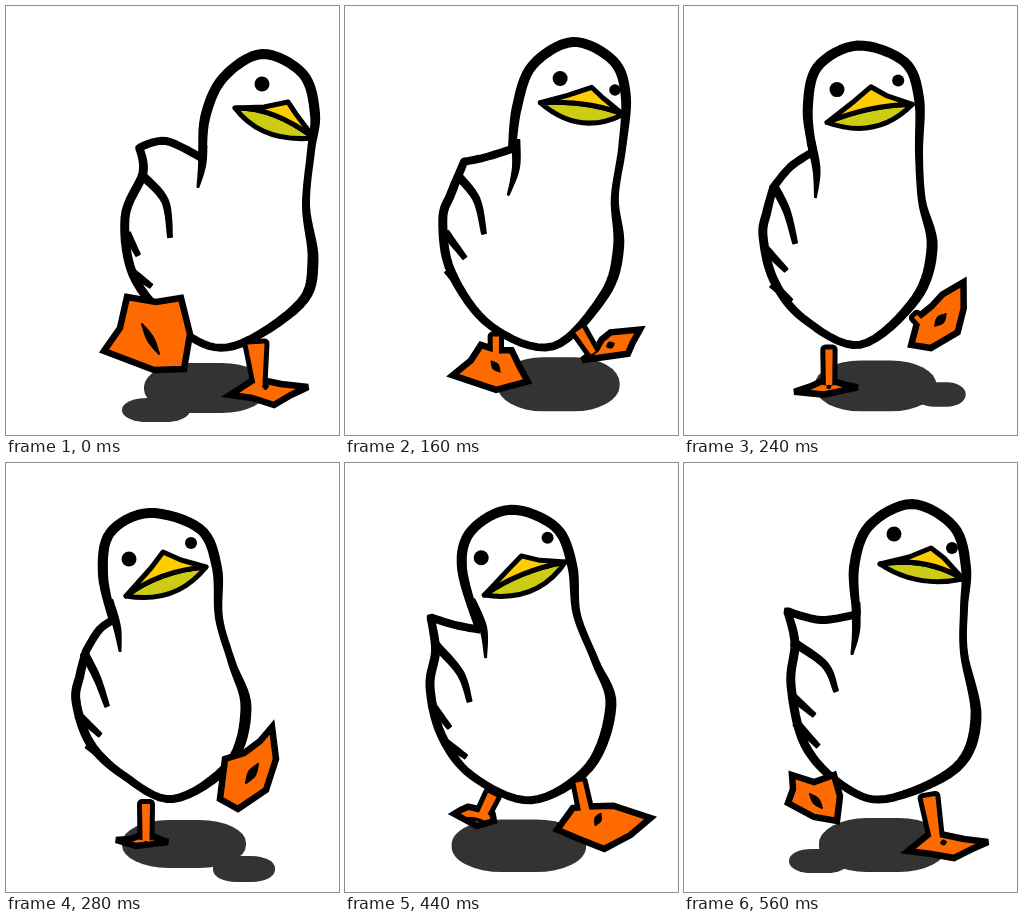
An HTML page that plays this animation: 333 px wide and 429 px high, repeating every 600 ms.

```html
<!DOCTYPE html>
<html lang="en">
<head>
<meta charset="utf-8">
<title>Walking duck</title>
<style>
html, body { margin: 0; width: 100%; height: 100%; overflow: hidden; background: #fff; }
svg { display: block; width: 100%; height: 100%; }
</style>
</head>
<body>
<svg id="stage" viewBox="0 0 333 429" stroke-linejoin="round"></svg>
<script>
const LOOP = 600, STEP = 40;
const INK = '#000', ORANGE = '#ff6a00', YELLOW = '#ffcc00', OLIVE = '#cccc14', SHADE = '#333';
const BODY_W = [8, 10, 10, 10, 10, 10, 8, 8, 11, 10, 8, 8, 9, 9, 9, 8, 8];
const poses = [];
const pose = (t, parts) => poses.push({ t, ...parts });

// body runs clockwise from the neck joint; feet run around their webbing
pose(0, {
  body: [197,153, 199,112, 217,72, 256,48, 297,68, 309,108, 305,145, 300,200, 307,255, 294,298, 228,340, 180,328, 130,275, 119,212, 137,167, 133,142, 160,135],
  neck: [197,140, 196,160, 192,181], wing: [137,170, 159,195, 164,231],
  notches: [121,228, 132,249, 127,267, 145,280],
  eyes: [256,78,7.5, 309,100,4],
  beak: [229,102, 258,101, 282,96, 290,108, 308,132, 262,127, 268,109],
  footL: [121,291, 150,296, 175,292, 184,328, 178,363, 148,364, 98,345, 114,322],
  footR: [224,389, 247,374, 256,374, 275,378, 302,381, 285,389, 268,399, 246,392],
  legL: [150,310,8, 150,330,8], legR: [250,338,17, 253,378,7],
  holeL: [136,318, 153,348, 8], holeR: [257,380, 262,380, 8],
  shade: [200,382,62,25, 150,404,34,12]
});
pose(80, {
  body: [185,159, 199,112, 218,74, 256,50, 296,72, 309,108, 303,150, 298,200, 300,250, 292,294, 240,338, 183,330, 122,266, 111,205, 128,172, 145,134, 163,150],
  neck: [195,136, 190,158, 180,178], wing: [128,173, 155,195, 164,224],
  notches: [115,222, 132,247, 114,250, 120,268],
  eyes: [258,78,7.5, 305,110,5],
  beak: [235,97, 258,100, 286,97, 292,108, 305,136, 262,127, 275,109],
  footL: [124,276, 155,288, 182,289, 185,328, 174,362, 148,365, 102,326, 119,305],
  footR: [228,379, 250,369, 256,369, 272,371, 293,371, 282,376, 275,382, 250,378],
  legL: [150,305,6, 150,325,6], legR: [247,337,17, 252,374,7],
  holeL: [142,308, 157,341, 8], holeR: [258,375, 263,376, 4],
  shade: [222,378,64,26, 150,412,37,15]
});
pose(200, {
  body: [154,138, 153,98, 166,55, 207,32, 249,49, 262,85, 260,140, 254,190, 260,238, 243,288, 190,341, 128,315, 98,268, 90,220, 95,195, 104,168, 125,153],
  neck: [154,134, 157,164, 152,193], wing: [103,170, 118,195, 125,231],
  notches: [92,232, 112,256, 97,273, 113,289],
  eyes: [188,73,7.5, 247,73,6],
  beak: [171,101, 200,87, 221,76, 235,86, 259,97, 217,114, 217,96],
  footL: [140,368, 150,370, 158,369, 168,375, 184,381, 150,391, 110,388, 128,377],
  footR: [238,343, 248,328, 255,315, 262,304, 293,299, 288,318, 283,333, 258,341],
  legL: [150,342,7, 150,374,6], legR: [229,317,5, 246,333,5],
  holeL: [147,377, 152,377, 7], holeR: [261,325, 269,319, 9],
  shade: [205,379,60,27, 262,376,22,12]
});
pose(280, {
  body: [107,157, 97,112, 104,70, 143,50, 194,66, 211,105, 213,155, 226,200, 240,245, 224,300, 167,336, 117,312, 84,280, 70,238, 74,212, 80,188, 93,167],
  neck: [103,138, 111,164, 114,188], wing: [78,190, 91,215, 101,243],
  notches: [72,252, 94,272, 82,282, 102,299],
  eyes: [123,96,7.5, 185,80,6],
  beak: [120,133, 145,105, 157,89, 175,97, 200,104, 165,130, 157,113],
  footL: [133,373, 141,375, 147,373, 153,376, 162,379, 130,383, 110,377, 124,376],
  footR: [214,336, 219,296, 238,290, 254,278, 266,264, 270,296, 260,327, 232,346],
  legL: [140,341,8, 140,379,7], legR: [235,305,5, 240,315,5],
  holeL: [139,379, 141,379, 2], holeR: [240,320, 252,301, 9],
  shade: [178,381,62,24, 238,406,31,13]
});
pose(360, {
  body: [113,163, 92,108, 101,75, 140,54, 187,72, 206,115, 212,153, 229,194, 242,240, 218,312, 168,335, 120,312, 86,275, 73,228, 77,190, 97,153, 106,158],
  neck: [104,142, 117,165, 123,191], wing: [82,200, 99,220, 105,246],
  notches: [76,252, 97,272, 87,285, 108,300],
  eyes: [120,102,7.5, 180,80,6],
  beak: [118,138, 138,112, 152,97, 170,102, 193,106, 165,134, 156,117],
  footL: [132,368, 141,370, 148,363, 156,367, 165,372, 140,379, 111,376, 124,372],
  footR: [207,318, 206,291, 226,286, 243,270, 272,300, 267,330, 238,349, 215,339],
  legL: [143,338,12, 140,372,8], legR: [228,303,5, 236,313,5],
  holeL: [139,374, 141,374, 2], holeR: [236,325, 240,290, 9],
  shade: [167,384,64,27, 232,411,35,16]
});
pose(480, {
  body: [147,166, 133,105, 143,64, 183,43, 227,61, 242,98, 245,150, 262,200, 278,245, 258,300, 195,338, 133,314, 103,272, 92,222, 98,187, 82,156, 112,163],
  neck: [140,136, 150,166, 150,195], wing: [96,174, 124,205, 135,234],
  notches: [93,237, 110,260, 105,274, 127,290],
  eyes: [151,89,7.5, 219,74,6],
  beak: [154,126, 180,103, 194,90, 212,95, 238,98, 200,124, 192,108],
  footL: [118,331, 130,334, 141,337, 145,343, 143,353, 128,356, 108,340, 112,335],
  footR: [216,389, 239,369, 250,369, 280,375, 318,377, 293,388, 270,400, 243,392],
  legL: [148,329,8, 136,343,8], legR: [238,327,9, 246,376,10],
  holeL: [118,345, 138,351, 5], holeR: [257,378, 263,378, 7],
  shade: [180,382,68,26, 125,372,20,10]
});
pose(560, {
  body: [173,151, 170,105, 185,63, 228,41, 270,64, 282,105, 280,145, 280,190, 292,255, 272,305, 202,336, 158,322, 121,282, 107,222, 111,180, 103,148, 137,157],
  neck: [172,140, 172,168, 168,191], wing: [109,179, 141,202, 152,228],
  notches: [109,234, 130,252, 112,260, 134,283],
  eyes: [210,71,7.5, 268,85,6],
  beak: [196,101, 225,94, 247,85, 260,95, 279,116, 235,117, 240,101],
  footL: [108,312, 130,319, 150,312, 156,333, 153,358, 130,354, 104,340, 109,326],
  footR: [224,388, 246,370, 256,371, 280,376, 304,379, 288,386, 270,395, 247,391],
  legL: [140,325,6, 135,335,6], legR: [245,334,13, 252,376,8],
  holeL: [126,331, 138,345, 8], holeR: [257,380, 262,379, 6],
  shade: [199,382,64,27, 135,398,30,12]
});

const stage = document.getElementById('stage');
function make(tag, attrs) {
  const el = document.createElementNS(stage.namespaceURI, tag);
  set(el, attrs);
  return stage.appendChild(el);
}
function set(el, attrs) {
  for (const k in attrs) el.setAttribute(k, attrs[k]);
}
const shape = (fill, stroke = 'none', width = 0) =>
  make('path', { fill, stroke, 'stroke-width': width });
const inkLine = () => shape(INK, INK, 2);

const shades = [0, 1].map(() => make('rect', { fill: SHADE }));
const skin = shape('#fff');
const outline = inkLine(), neck = inkLine(), wing = inkLine();
const notches = [inkLine(), inkLine()];
const eyes = [0, 1].map(() => make('circle', { fill: INK }));
const lip = shape(OLIVE, INK, 5), bill = shape(YELLOW, INK, 5);
const limbs = ['L', 'R'].map(side => ({
  side,
  edge: shape(INK, INK, 10),
  foot: make('path', { fill: ORANGE, stroke: INK, 'stroke-width': 6.5, 'stroke-linejoin': 'miter', 'stroke-miterlimit': 3 }),
  leg: shape(ORANGE),
  hole: inkLine()
}));

const hermite = (a, b, ma, mb, u) => {
  const v = u * u, c = v * u;
  return (2 * c - 3 * v + 1) * a + (c - 2 * v + u) * ma + (3 * v - 2 * c) * b + (c - v) * mb;
};

// cyclic smooth blend between unevenly timed poses
function poseAt(t) {
  const n = poses.length;
  const at = i => poses[(i + n) % n];
  const time = i => at(i).t + LOOP * Math.floor(i / n);
  let i = n - 1;
  while (at(i).t > t) i--;
  const span = time(i + 1) - time(i), u = (t - time(i)) / span;
  const before = span / (time(i + 1) - time(i - 1));
  const after = span / (time(i + 2) - time(i));
  const out = {};
  for (const part in poses[0]) {
    if (part === 't') continue;
    const [p, a, b, q] = [-1, 0, 1, 2].map(k => at(i + k)[part]);
    out[part] = a.map((x, k) => hermite(x, b[k], (b[k] - p[k]) * before, (q[k] - x) * after, u));
  }
  return out;
}

function pairs(list) {
  const out = [];
  for (let i = 0; i < list.length; i += 2) out.push([list[i], list[i + 1]]);
  return out;
}

function spline(pts, loop, sharp = []) {
  const n = pts.length, out = [];
  const at = i => loop ? pts[(i + n) % n] : pts[Math.max(0, Math.min(n - 1, i))];
  const slope = (i, k) => sharp.includes(i % n) ? 0 : (at(i + 1)[k] - at(i - 1)[k]) / 2;
  const last = loop ? n : n - 1;
  for (let i = 0; i < last; i++) {
    for (let s = 0; s < 8; s++) {
      out.push(at(i).map((v, k) => hermite(v, at(i + 1)[k], slope(i, k), slope(i + 1, k), s / 8)));
    }
  }
  out.push(at(last));
  return out;
}

const poly = pts => 'M' + pts.map(p => p[0].toFixed(1) + ' ' + p[1].toFixed(1)).join('L') + 'Z';

// a line whose points carry their own width
function ribbon(pts, trim = 2) {
  const left = [], right = [];
  pts.forEach(([x, y, w], i) => {
    const a = pts[Math.max(0, i - 1)], b = pts[Math.min(pts.length - 1, i + 1)];
    const dx = b[0] - a[0], dy = b[1] - a[1];
    const k = Math.max(0.2, w - trim) / 2 / (Math.hypot(dx, dy) || 1);
    left.push([x - dy * k, y + dx * k]);
    right.unshift([x + dy * k, y - dx * k]);
  });
  return poly(left.concat(right));
}
const brush = (list, widths) => ribbon(spline(pairs(list).map((p, i) => [...p, widths[i]])));

// control point of a quadratic that passes through mid
const bend = (a, mid, b) => [0, 1].map(k => 2 * mid[k] - (a[k] + b[k]) / 2);

function draw(t) {
  const p = poseAt(t);

  shades.forEach((el, i) => {
    const [x, y, rx, ry] = p.shade.slice(i * 4, i * 4 + 4);
    set(el, { x: x - rx, y: y - ry, width: 2 * rx, height: 2 * ry, rx: rx * 0.75, ry: ry * 0.95 });
  });

  const body = spline(pairs(p.body).map((q, i) => [...q, BODY_W[i]]), true, [0, 15]);
  set(skin, { d: poly(body) });
  set(outline, { d: ribbon(body) });
  set(neck, { d: brush(p.neck, [9, 8, 3]) });
  set(wing, { d: brush(p.wing, [9, 8, 6]) });
  notches.forEach((el, i) => set(el, { d: brush(p.notches.slice(i * 4, i * 4 + 4), [9, 6]) }));

  eyes.forEach((el, i) => set(el, { cx: p.eyes[i * 3], cy: p.eyes[i * 3 + 1], r: p.eyes[i * 3 + 2] }));

  const [l, t1, top, t2, r, low, mid] = pairs(p.beak);
  const mouth = bend(l, mid, r);
  set(lip, { d: `M${l}Q${bend(l, low, r)} ${r}Q${mouth} ${l}Z` });
  set(bill, { d: `M${l}L${t1}L${top}L${t2}L${r}Q${mouth} ${l}Z` });

  for (const m of limbs) {
    const leg = p['leg' + m.side], bone = [leg.slice(0, 3), leg.slice(3)];
    const [x1, y1, x2, y2, w] = p['hole' + m.side];
    set(m.edge, { d: ribbon(bone, 0) });
    set(m.leg, { d: ribbon(bone, 0) });
    set(m.foot, { d: poly(pairs(p['foot' + m.side])) });
    set(m.hole, { d: brush([x1, y1, (x1 + x2) / 2, (y1 + y2) / 2, x2, y2], [2, w, 2]) });
  }
}

const start = performance.now();
function tick() {
  const t = (performance.now() - start) % LOOP;
  draw(Math.floor(t / STEP) * STEP);
  requestAnimationFrame(tick);
}
tick();
</script>
</body>
</html>
```
